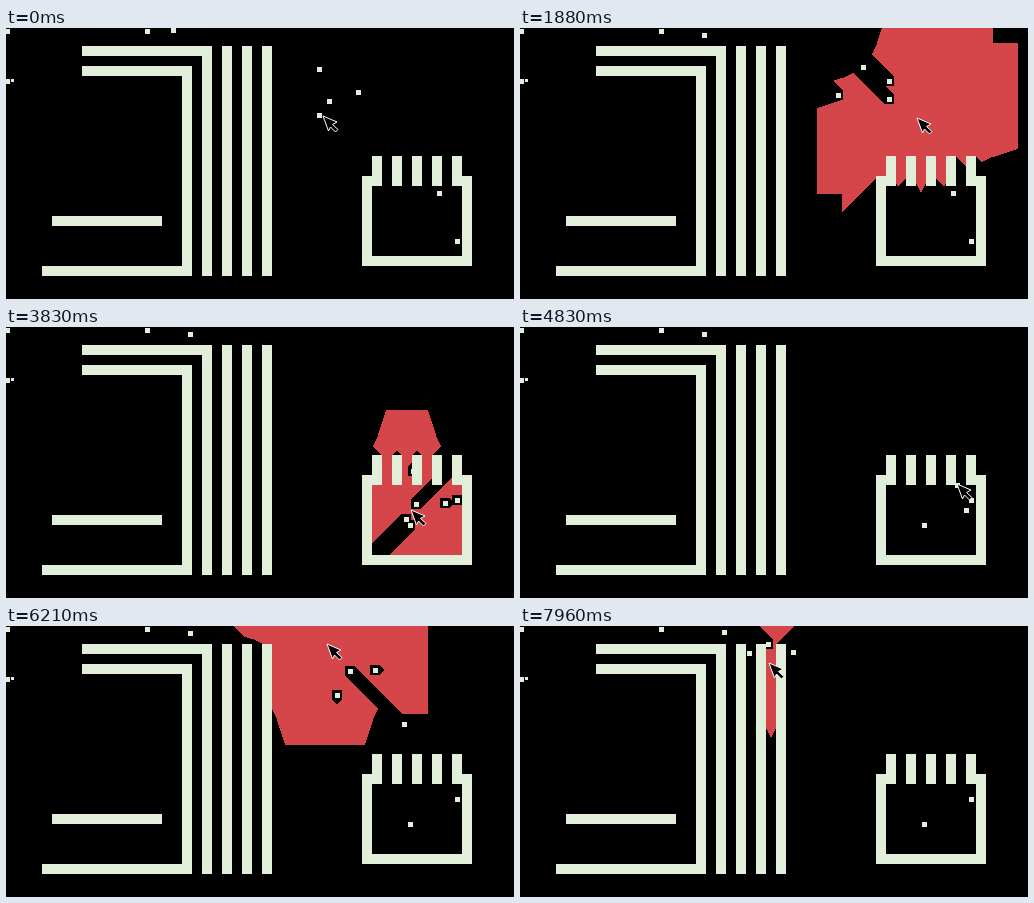
Write an HTML page with a canvas that moves like this. It is 508x271 px and loops after 8000 ms.

```html
<!DOCTYPE html>
<html lang="en">
<head>
<meta charset="utf-8">
<title>Light around walls</title>
<style>
html, body { margin: 0; width: 100%; height: 100%; overflow: hidden; background: #000; }
canvas { display: block; width: 100vw; height: 100vh; }
</style>
</head>
<body>
<canvas width="508" height="271"></canvas>
<script>
const W = 508, H = 271, LOOP = 8000, REACH = 100;
const PALE = '#e1eeda', RED = 0xff4a46d4, BLACK = 0xff000000;
const ctx = document.querySelector('canvas').getContext('2d');
const image = ctx.createImageData(W, H);
const pixels = new Uint32Array(image.data.buffer);

// Walls are strokes of one brick's width.
const BRICK = 10;
const across = (x, y, w) => ({ x, y, w, h: BRICK });
const upright = (x, y, h) => ({ x, y, w: BRICK, h });
const repeat = (count, make) => Array.from({ length: count }, (_, i) => make(i));
const walls = [
  across(76, 18, 130), across(76, 38, 110), upright(176, 38, 210),
  across(36, 238, 150), across(46, 188, 110),
  ...repeat(4, i => upright(196 + 20 * i, 18, 230)),
  ...repeat(5, i => upright(366 + 20 * i, 128, 30)),
  ...repeat(2, i => upright(356 + 100 * i, 148, 90)),
  ...repeat(2, i => across(356 + 90 * i, 148, 20)),
  across(356, 228, 110)
];

function fillGrid(grid, { x, y, w, h }) {
  const left = Math.max(0, x), right = Math.min(W, x + w);
  for (let row = Math.max(0, y); row < Math.min(H, y + h); row++) {
    if (right > left) grid.fill(1, row * W + left, row * W + right);
  }
}
const wallGrid = new Uint8Array(W * H);
walls.forEach(wall => fillGrid(wallGrid, wall));
const solid = new Uint8Array(W * H);

// turning points of the pointer: time, x, y
const pointerPath = [
  [-200, 326, 64], [0, 317, 88], [350, 268, 10], [650, 390, 85], [880, 434, 72],
  [1350, 283, 12], [1880, 397, 90], [2600, 425, 122], [2920, 417, 99],
  [3450, 421, 165], [3900, 402, 186], [4500, 436, 160], [4830, 437, 157],
  [5200, 420, 100], [5830, 390, 98], [6210, 321, 18], [6700, 268, 10],
  [7800, 248, 14], [7960, 249, 37]
];

function along(path, time) {
  let i = 1;
  while (i < path.length - 1 && path[i][0] < time) i++;
  const [t0, x0, y0] = path[i - 1], [t1, x1, y1] = path[i];
  const k = Math.min(1, Math.max(0, (time - t0) / (t1 - t0)));
  return [Math.round(x0 + (x1 - x0) * k), Math.round(y0 + (y1 - y0) * k)];
}

const strays = [
  [[0, 167, 2], [800, 184, 7], [6300, 184, 7], [7500, 204, 6]],
  [[2600, 433, 165], [3000, 404, 198]],
  [[2600, 451, 213], [3000, 451, 173]]
];

// Chasers trail the pointer; all but the first circle around its trail.
function chaser(i, time) {
  const [x, y] = along(pointerPath, time - 130 - 60 * i);
  const radius = i ? 26 : 0, angle = i * 2.1 + time / 900;
  return [Math.round(x + radius * Math.cos(angle)), Math.round(y + radius * Math.sin(angle))];
}

const inside = (x, y) => x >= 0 && y >= 0 && x < W && y < H;
const isSolid = (x, y) => inside(x, y) && solid[y * W + x];

// Light advances pixel by pixel, fanning out at 45 degrees. Far from its
// start it stops fanning, thins out along edges and drifts off the axis.
function castCone(sx, sy, dx, dy) {
  const middle = REACH + 2;
  let lit = new Uint8Array(middle * 2 + 1);
  lit[middle] = 1;
  for (let step = 1; step <= REACH; step++) {
    const next = new Uint8Array(lit.length);
    const rim = Math.min(step, 75) - 10;
    const spread = Math.min(step, 75);
    const thins = step > 65 && step % (step < 76 ? 2 : 3) === 0;
    const carries = side => lit[middle + side] || Math.abs(side) > rim;
    for (let side = -spread; side <= spread; side++) {
      const x = sx + dx * step - dy * side, y = sy + dy * step + dx * side;
      if (isSolid(x, y)) continue;
      const i = middle + side;
      const fans = step < 65 || (step < 76 && Math.abs(side) > rim);
      let on = lit[i] || (fans && (lit[i - 1] || lit[i + 1]));
      if (thins && !fans) on = on && carries(side - 1) && carries(side + 1);
      if (step > 60 && Math.abs(side) > 8) on = on && lit[i - Math.sign(side)];
      if (!on) continue;
      next[i] = 1;
      if (inside(x, y)) pixels[y * W + x] = RED;
    }
    lit = next;
  }
}

function drawSpeck([x, y], size = 5) {
  ctx.fillRect(x - (size >> 1), y - (size >> 1), size, size);
}

const arrow = new Path2D('M0 0L14 6L9.5 8.5L15 13.5L12.5 16L7.5 11L5.5 15Z');
function drawPointer(x, y) {
  ctx.save();
  ctx.translate(x, y);
  ctx.fillStyle = '#000';
  ctx.strokeStyle = '#fff';
  ctx.fill(arrow);
  ctx.stroke(arrow);
  ctx.restore();
}

function draw(time) {
  const specks = [
    ...strays.map(path => along(path, time)),
    ...repeat(4, i => chaser(i, time))
  ];
  solid.set(wallGrid);
  specks.forEach(([x, y]) => fillGrid(solid, { x: x - 5, y: y - 5, w: 10, h: 10 }));

  const [px, py] = along(pointerPath, time);
  pixels.fill(BLACK);
  if (!isSolid(px, py)) {
    pixels[py * W + px] = RED;
    [[1, 0], [-1, 0], [0, 1], [0, -1]].forEach(([dx, dy]) => castCone(px, py, dx, dy));
  }
  ctx.putImageData(image, 0, 0);

  ctx.fillStyle = PALE;
  walls.forEach(({ x, y, w, h }) => ctx.fillRect(x, y, w, h));
  [[1, 3], [1, 53], [141, 3], ...specks].forEach(place => drawSpeck(place));
  drawSpeck([6, 52], 3);
  drawPointer(px, py);
}

const start = performance.now();
function frame() {
  draw((performance.now() - start) % LOOP);
  requestAnimationFrame(frame);
}
frame();
</script>
</body>
</html>
```
